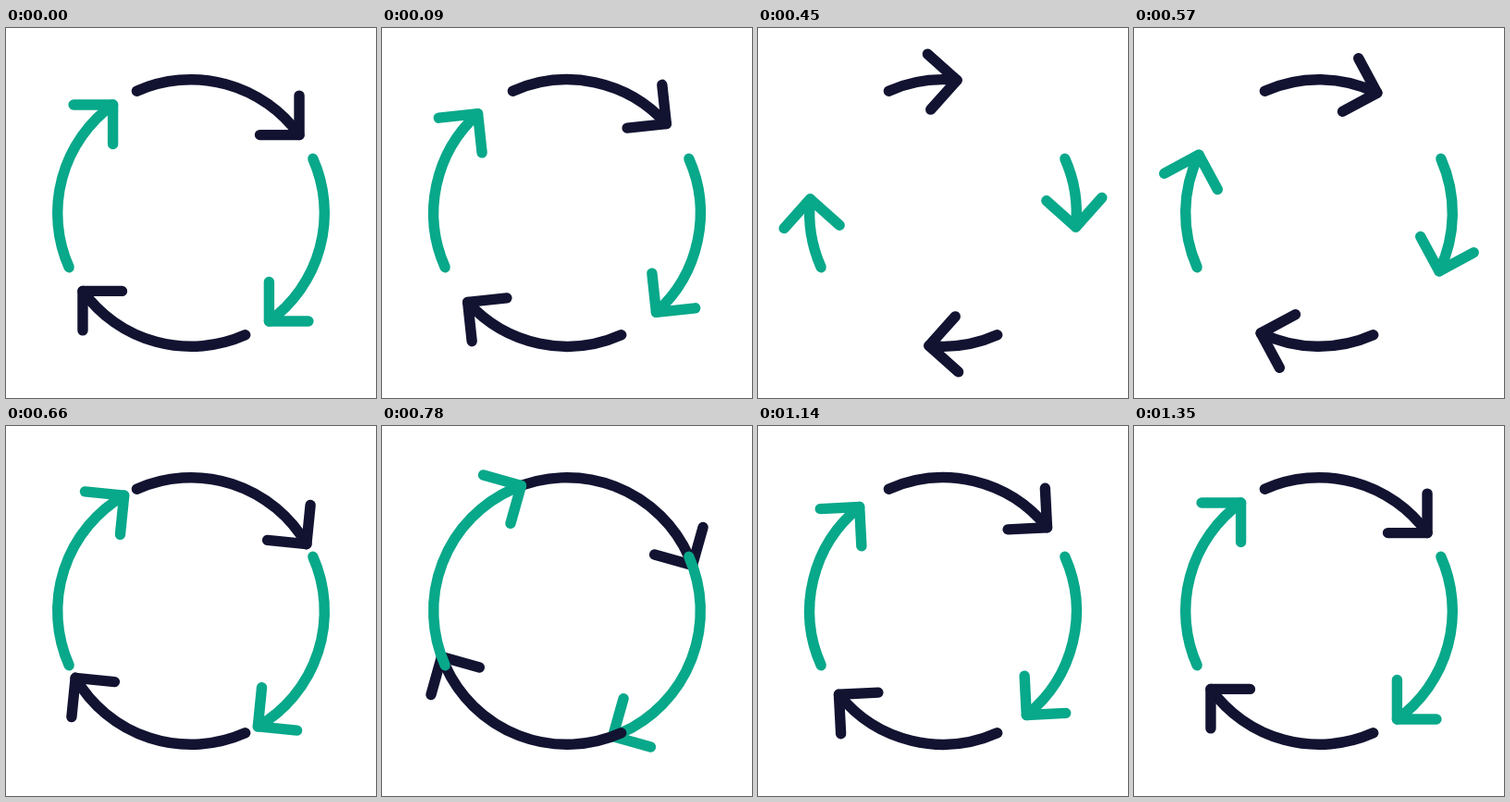
Recreate the animation shown at these times as an HTML page with a canvas. Size 400 by 400 pixels, loop 2.88 s.

```html
<!DOCTYPE html>
<html lang="en">
<head>
<meta charset="utf-8">
<title>Turning arrows</title>
<style>
  html, body { margin: 0; width: 100%; height: 100%; overflow: hidden; background: #fff; }
  canvas { display: block; width: 400px; height: 400px; }
</style>
</head>
<body>
<canvas id="stage" width="400" height="400"></canvas>
<script>
const ctx = document.getElementById('stage').getContext('2d');
const LOOP = 2880, STEP = 30;
const RADIUS = 144.3, LEG = 42.5;
const RAD = Math.PI / 180;
const TAIL = -114 * RAD, TIP = -35.8 * RAD;
const COLORS = ['#121331', '#08a88a'];

// [time in ms, swing in degrees, easing strength on the way there]
const KEYS = [
  [0, 0, 0],
  [300, -48.2, 0.6],
  [450, -48.2, 0.5],
  [750, 16, 0.5],
  [1050, -3.5, 0.5],
  [1350, 0, 0.5]
];

// Symmetric cubic-bezier(k, 0, 1 - k, 1)
function ease(x, k) {
  let lo = 0, hi = 1;
  for (let i = 0; i < 24; i++) {
    const t = (lo + hi) / 2, u = 1 - t;
    const bx = 3 * u * u * t * k + 3 * u * t * t * (1 - k) + t * t * t;
    if (bx < x) lo = t; else hi = t;
  }
  return lo * lo * (3 - 2 * lo);
}

function swingAt(time) {
  const i = KEYS.findIndex(key => key[0] > time);
  if (i < 0) return 0;
  const [t0, from] = KEYS[i - 1], [t1, to, k] = KEYS[i];
  return (from + (to - from) * ease((time - t0) / (t1 - t0), k)) * RAD;
}

function drawArrow(swing) {
  ctx.beginPath();
  ctx.arc(0, 0, RADIUS, TAIL, TIP + swing);
  ctx.stroke();

  const x = RADIUS * Math.cos(TIP), y = RADIUS * Math.sin(TIP);
  ctx.save();
  ctx.rotate(swing);
  ctx.beginPath();
  ctx.moveTo(x, y - LEG);
  ctx.lineTo(x, y);
  ctx.lineTo(x - LEG, y);
  ctx.stroke();
  ctx.restore();
}

function draw(time) {
  const swing = swingAt(time);
  ctx.fillStyle = '#fff';
  ctx.fillRect(0, 0, 400, 400);
  ctx.lineWidth = 11.4;
  ctx.lineCap = ctx.lineJoin = 'round';
  for (let i = 0; i < 4; i++) {
    ctx.save();
    ctx.translate(200, 200);
    ctx.rotate(i * Math.PI / 2);
    ctx.strokeStyle = COLORS[i % 2];
    drawArrow(swing);
    ctx.restore();
  }
}

const start = performance.now();
function tick() {
  const time = (performance.now() - start) % LOOP;
  draw(Math.floor(time / STEP) * STEP);
  requestAnimationFrame(tick);
}
tick();
</script>
</body>
</html>
```
